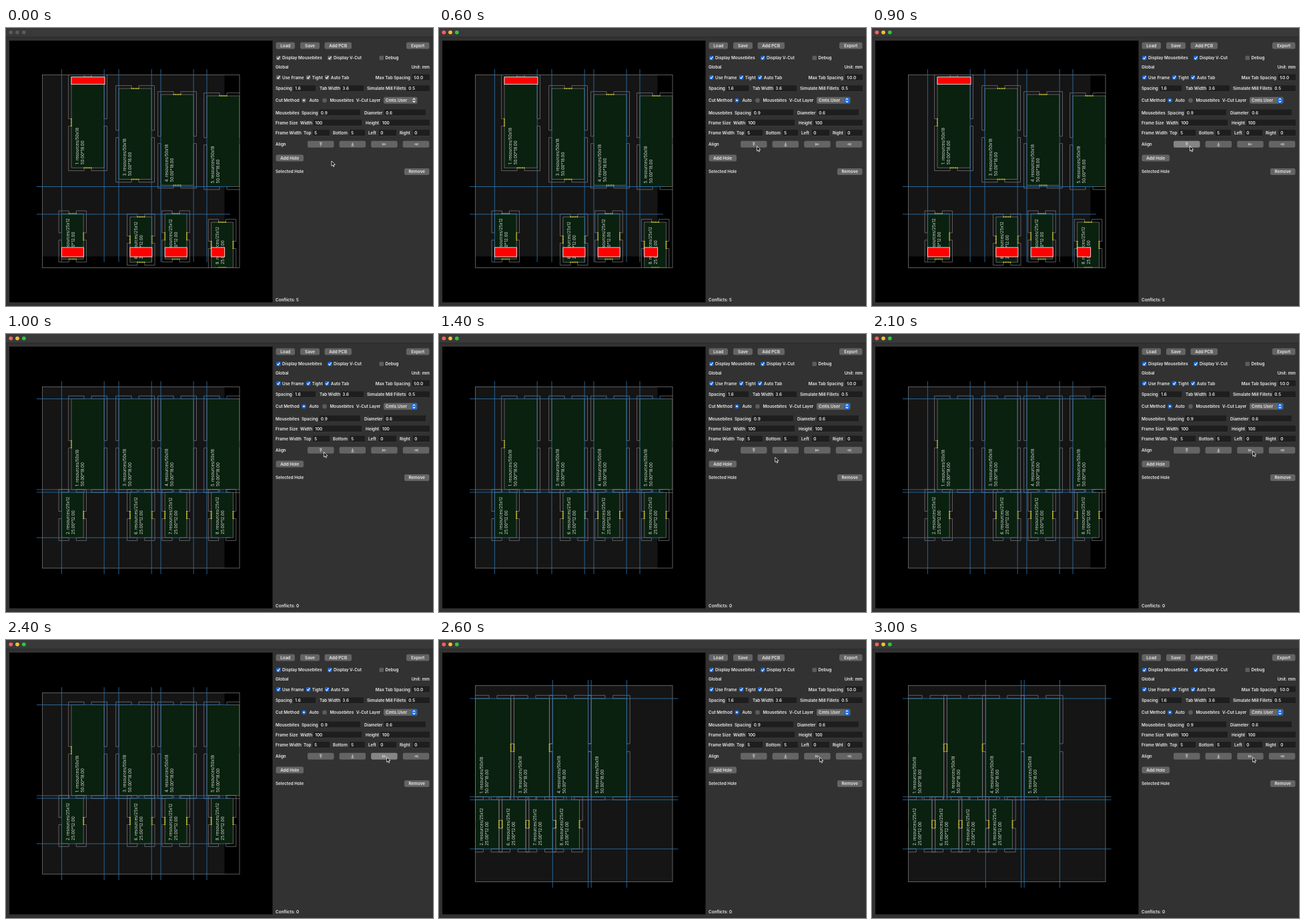
An HTML page that plays this animation: 640 by 418 pixels, repeating every 3100 ms.

```html
<!DOCTYPE html>
<html lang="en">
<head>
<meta charset="utf-8">
<title>Panel layout</title>
<style>
  html, body { margin: 0; width: 100%; height: 100%; overflow: hidden; background: #323232; }
  svg { display: block; width: 640px; height: 418px; }
  text { font: 600 6.3px Inter, "Open Sans", sans-serif; font-feature-settings: "calt" 0; fill: #ececec; white-space: pre; }
  .board text { font-weight: 400; font-size: 6.25px; fill: #d8dcd8; }
  .slot { fill: none; stroke: #808080; stroke-width: .7; }
  .cut { stroke: #2b74ad; stroke-width: .85; }
  .bites { stroke: #cfc93a; stroke-width: 2.1; stroke-linecap: round; stroke-dasharray: 0 2.5; }
  .clash { fill: #f00; stroke: #fff; stroke-width: .8; }
  .btn { fill: #646464; }
  .icon { fill: none; stroke: #dcdcdc; stroke-width: .8; }
  .check { fill: none; stroke: #fff; stroke-width: 1.1; stroke-linecap: round; stroke-linejoin: round; }
</style>
</head>
<body>
<svg id="stage" viewBox="0 0 640 418" xmlns="http://www.w3.org/2000/svg"></svg>
<script>
const LOOP = 3100, STEP = 100;
const stage = document.getElementById('stage');

function add(parent, tag, attrs = {}, text) {
  const el = document.createElementNS('http://www.w3.org/2000/svg', tag);
  for (const k in attrs) el.setAttribute(k, attrs[k]);
  if (text !== undefined) el.textContent = text;
  parent.appendChild(el);
  return el;
}
const rect = (p, x, y, width, height, more) => add(p, 'rect', { x, y, width, height, ...more });
const line = (p, x1, y1, x2, y2, cls) => add(p, 'line', { x1, y1, x2, y2, class: cls });
const label = (x, y, str, anchor = 'start') =>
  add(stage, 'text', { x, y: y + 2.3, 'text-anchor': anchor }, str);

// ---- window ----
rect(stage, 0, 0, 640, 418, { fill: '#323232' });
rect(stage, 0, 0, 640, 14, { fill: '#393939' });
rect(stage, 0, 13.5, 640, .6, { fill: '#202020' });
const lights = [7.3, 17, 26.8].map(cx => add(stage, 'circle', { cx, cy: 6.6, r: 2.9 }));
rect(stage, 5, 19, 394.5, 393.5, { fill: '#000' });

// ---- board views ----
function drawBoard(g, view, b) {
  const { scale: s, cutX, cutY } = view;
  const w = b.w * s, h = b.h * s, gap = 1.6 * s, t = 2 * s;
  const cx = b.x + w / 2, cy = b.y + h / 2;
  rect(g, b.x, b.y, w, h, { fill: '#0a210f' });
  for (const sx of [-1, 1]) for (const sy of [-1, 1]) {
    const ex = cx + sx * w / 2, ey = cy + sy * h / 2;
    add(g, 'path', { class: 'slot',
      d: `M${cx + sx * t} ${ey}V${ey + sy * gap}H${ex + sx * gap}V${cy + sy * t}H${ex}V${ey}Z` });
  }
  const free = (v, cuts) => cuts.every(c => Math.abs(c - v) > .3);
  for (const x of [b.x, b.x + w])
    if (x > 56 && x < 349 && free(x, cutX)) line(g, x, cy - 5, x, cy + 5.1, 'bites');
  for (const y of [b.y, b.y + h])
    if (free(y, cutY)) line(g, cx - 5, y, cx + 5.1, y, 'bites');
  const size = [b.h, b.w];
  [`${b.id}. resources/${size.join('x')}`, size.map(n => n.toFixed(2)).join('*')].forEach((str, i) =>
    add(g, 'text', { transform: `translate(${b.x + 11.2 + i * 8} ${b.y + h - 5}) rotate(-90)` }, str));
}

function drawView(view, n) {
  const { scale: s, top, height, cutX, cutY, clashes = [] } = view;
  const left = 54.5, mm = 100 * s;
  const g = add(stage, 'g', { class: 'board' });
  const clip = add(add(g, 'defs'), 'clipPath', { id: 'clip' + n });
  rect(clip, left - .5, top - .5, 296.5, height + 1);
  rect(g, left, top, mm, mm, { fill: '#151515' });
  const inner = add(g, 'g', { 'clip-path': `url(#clip${n})` });
  view.boards.forEach(b => drawBoard(inner, view, b));
  rect(g, left, top, 295.5, height, { fill: 'none', stroke: '#747474', 'stroke-width': .8 });
  cutX.forEach(x => line(g, x, top - 8.5, x, top + mm + 8.5, 'cut'));
  cutY.forEach(y => line(g, left - 8.5, y, left + mm + 8.5, y, 'cut'));
  clashes.forEach(c => rect(g, ...c, { class: 'clash' }));
  return g;
}

const IDS = [1, 3, 4, 5, 2, 6, 7, 8];
const makeBoards = (xs, ys) => IDS.map((id, i) =>
  ({ id, x: xs[i], y: ys[i], w: i < 4 ? 18 : 12, h: i < 4 ? 50 : 25 }));
const rows = (a, b) => IDS.map((_, i) => i < 4 ? a : b);

const looseX = [98, 169, 232, 301, 83.4, 185.9, 238.2, 307.7];
const looseCuts = [83.4, 147.14, 169, 218.14, 232, 281.14, 301];
const tight = 2.955;
const tightX = IDS.map((_, i) => 54.5 + (i % 4) * (i < 4 ? 19.6 : 13.6) * tight);

const views = [
  { scale: 2.73, top: 70.5, height: 290, cutX: looseCuts, cutY: [238.5, 280],
    boards: makeBoards(looseX, [73.7, 91, 100, 102, 279.3, 284, 279.2, 292]),
    clashes: [[98, 73.7, 50, 11], [83.4, 330, 33, 14], [185.9, 330, 33, 14],
              [238.2, 330, 33, 14], [307.7, 330, 20, 14]] },
  { scale: 2.73, top: 79.5, height: 272.5, cutX: looseCuts, cutY: [97.5, 234, 238, 306.25],
    boards: makeBoards(looseX, rows(97.5, 238)) },
  { scale: tight, top: 68.5, height: 295, cutX: [170.3, 223.5, 228.2, 281.4],
    cutY: [88, 235.75, 240.2, 314.08], boards: makeBoards(tightX, rows(88, 240.2)) }
].map(drawView);

// ---- controls ----
const accents = [];

function button(x, y, w, str) {
  const el = rect(stage, x, y - 5, w, 10, { rx: 2.3, class: 'btn' });
  if (str) label(x + w / 2, y, str, 'middle');
  return el;
}
function checkbox(x, y, str, on = true) {
  const box = rect(stage, x, y - 3.3, 6.6, 6.6, { rx: 1.6, fill: '#5c5c5c' });
  if (on) {
    accents.push(box);
    add(stage, 'path', { class: 'check', d: `M${x + 1.7} ${y + .2}l1.3 1.6 2.2 -3.6` });
  }
  label(x + 9, y, str);
}
function radio(cx, cy, str, on) {
  const dot = add(stage, 'circle', { cx, cy, r: 3.4, fill: '#5c5c5c' });
  if (on) {
    accents.push(dot);
    add(stage, 'circle', { cx, cy, r: 1.3, fill: '#fff' });
  }
  label(cx + 8, cy, str);
}
function field(x, y, right, str) {
  rect(stage, x, y - 4.7, right - x, 9.4, { fill: '#1e1e1e' });
  rect(stage, x, y + 4.4, right - x, .5, { fill: '#4a4a4a' });
  label(x + 2.3, y, str);
}

button(404.5, 26.5, 28.5, 'Load');
button(441, 26.5, 29, 'Save');
button(477.5, 26.5, 40.5, 'Add PCB');
button(600, 26.5, 34.5, 'Export');

checkbox(405, 45, 'Display Mousebites');
checkbox(482, 45, 'Display V-Cut');
checkbox(559.5, 45, 'Debug', false);

label(404, 58.5, 'Global');
label(635, 58.5, 'Unit: mm', 'end');

checkbox(405, 74.3, 'Use Frame');
checkbox(449.8, 74.3, 'Tight');
checkbox(477.8, 74.3, 'Auto Tab');
label(606, 74.3, 'Max Tab Spacing', 'end');
field(609, 74.3, 635, '50.0');

label(404, 91, 'Spacing');
field(431, 91, 464, '1.6');
label(470, 91, 'Tab Width');
field(502, 91, 536, '3.6');
label(541, 91, 'Simulate Mill Fillets');
field(601, 91, 635, '0.5');

label(404, 108.8, 'Cut Method');
radio(446.5, 108.8, 'Auto', true);
radio(477.5, 108.8, 'Mousebites', false);
label(525, 108.8, 'V-Cut Layer');
button(566, 108.8, 50.5);
label(569, 108.8, 'Cmts.User');
accents.push(rect(stage, 607.5, 104.7, 8, 8.2, { rx: 1.8, fill: '#646464' }));
add(stage, 'path', { class: 'check', d: 'M610 107.6l1.5 -1.5 1.5 1.5M610 110l1.5 1.5 1.5 -1.5' });

label(404, 127.2, 'Mousebites');
label(443, 127.2, 'Spacing');
field(469.5, 127.2, 531, '0.9');
label(537, 127.2, 'Diameter');
field(567, 127.2, 629, '0.6');

label(404, 142.5, 'Frame Size');
label(441, 142.5, 'Width');
field(461, 142.5, 533, '100');
label(539, 142.5, 'Height');
field(561.5, 142.5, 635, '100');

label(404, 157.7, 'Frame Width');
[['Top', 446, 460, 485, 5], ['Bottom', 490, 515, 538, 5],
 ['Left', 543, 559, 585, 0], ['Right', 590, 610, 635, 0]].forEach(([str, x, l, r, v]) => {
  label(x, 157.7, str);
  field(l, 157.7, r, v);
});

label(404, 174.8, 'Align');
const align = [0, 180, -90, 90].map((turn, i) => {
  const x = 452 + i * 47.6, el = button(x, 174.8, 39.5);
  add(stage, 'path', { class: 'icon', d: 'M-2 -2.6H2M0 2.8V-1.4M-1.6 .4L0 -1.4L1.6 .4',
    transform: `translate(${x + 19.8} 174.8) rotate(${turn})` });
  return el;
});

button(404.5, 195.6, 41.5, 'Add Hole');
label(404, 216, 'Selected Hole');
button(597, 216, 37.5, 'Remove');
const conflicts = label(404, 408.5, '');

const pointer = add(stage, 'path', { d: 'M0 0V7.4L1.7 5.9L2.8 8.5L4 8L2.9 5.4H5.2Z',
  fill: '#000', stroke: '#fff', 'stroke-width': .8, 'stroke-linejoin': 'round' });

// ---- timeline ----
const path = [[0, 488, 200], [200, 477, 178.5], [300, 477, 178.5], [400, 476.6, 177.6],
  [1100, 476.6, 177.6], [1700, 531, 193], [2100, 570.7, 176.2], [LOOP, 570.7, 176.2]];

function pointerAt(t) {
  const i = path.findIndex(p => p[0] > t);
  const [t0, x0, y0] = path[i - 1], [t1, x1, y1] = path[i];
  const u = (t - t0) / (t1 - t0), k = u * u * (3 - 2 * u);
  return [x0 + (x1 - x0) * k, y0 + (y1 - y0) * k];
}

function render(ms) {
  const t = Math.floor(ms % LOOP / STEP) * STEP;
  const active = t >= 600;
  const shown = t < 1000 ? 0 : t < 2600 ? 1 : 2;
  views.forEach((g, i) => g.setAttribute('display', i === shown ? 'inline' : 'none'));
  conflicts.textContent = `Conflicts: ${shown ? 0 : 5}`;
  lights.forEach((el, i) =>
    el.setAttribute('fill', active ? ['#ff5f57', '#febc2e', '#28c840'][i] : '#5a5a5a'));
  accents.forEach(el => el.setAttribute('fill', active ? '#1766d8' : '#646464'));
  const pressed = t === 900 ? 0 : t >= 2400 && t < 2600 ? 2 : -1;
  align.forEach((el, i) => el.style.fill = i === pressed ? '#858585' : '');
  pointer.setAttribute('transform', `translate(${pointerAt(t)})`);
}

const start = performance.now();
function tick() {
  render(performance.now() - start);
  requestAnimationFrame(tick);
}
tick();
</script>
</body>
</html>
```
